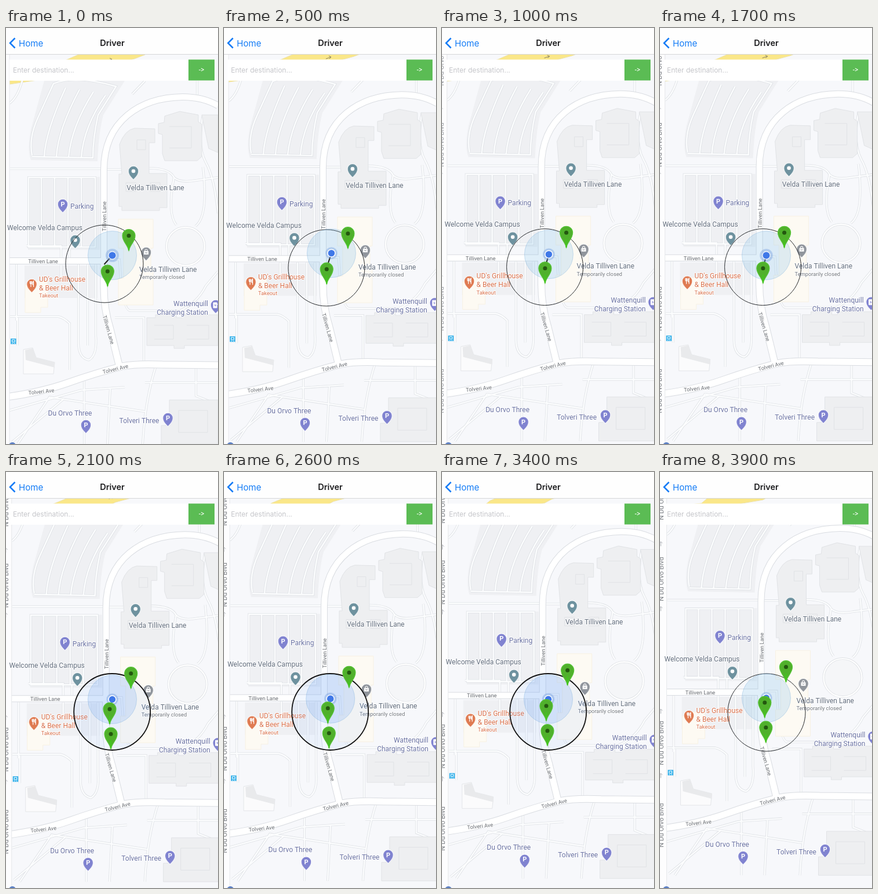
An HTML page with a canvas for the animation above (4000 ms loop, 366x718 px).

```html
<!DOCTYPE html>
<html lang="en">
<head>
<meta charset="utf-8">
<title>Driver</title>
<style>
html, body { margin: 0; width: 366px; height: 718px; overflow: hidden; background: #fff; }
canvas { display: block; width: 366px; height: 718px; }
</style>
</head>
<body>
<canvas id="stage"></canvas>
<script>
const W = 366, H = 718, LOOP = 4000, STEP = 100;
const canvas = document.getElementById('stage');
const ctx = canvas.getContext('2d');
const ratio = window.devicePixelRatio || 1;
canvas.width = W * ratio;
canvas.height = H * ratio;

const SLATE = '#626d7d', TEAL = '#6e929f', PURPLE = '#8083d0', INDIGO = '#6b73a3', ORANGE = '#df7b52';

// The map recentres in short moves; the dot rides along, then slides back to the middle.
const MAP_KEYS = [[0, 0, 0], [300, 0, 0], [600, 2.6, -5.2], [1700, 2.6, -5.2], [2000, 3.7, -10.8],
  [2500, 3.7, -10.8], [2800, 4.7, -16.3], [3600, 4.7, -16.3], [3900, 5.5, -21.9]];
const DOT_KEYS = [[0, 183.5, 392.5], [300, 183.5, 392.5], [600, 186.1, 387.3], [700, 186.1, 387.3], [1200, 183.5, 392.5],
  [2500, 183.5, 392.5], [2800, 184.2, 388.3], [3200, 183.5, 392.3], [3600, 183.5, 392.3], [3900, 183.5, 390]];

function ease(keys, t) {
  const next = keys.findIndex(k => k[0] > t);
  if (next < 0) return keys[keys.length - 1].slice(1);
  const a = keys[next - 1], b = keys[next];
  const p = (t - a[0]) / (b[0] - a[0]), s = p * p * (3 - 2 * p);
  return [1, 2].map(i => a[i] + (b[i] - a[i]) * s);
}

function shape(d, fill, line, width = 1) {
  const path = new Path2D(d);
  if (fill) { ctx.fillStyle = fill; ctx.fill(path); }
  if (line) { ctx.strokeStyle = line; ctx.lineWidth = width; ctx.stroke(path); }
}

function disc(x, y, r, fill, line, width = 1) {
  ctx.beginPath();
  ctx.arc(x, y, r, 0, Math.PI * 2);
  if (fill) { ctx.fillStyle = fill; ctx.fill(); }
  if (line) { ctx.strokeStyle = line; ctx.lineWidth = width; ctx.stroke(); }
}

function text(str, x, y, { size = 12, color = SLATE, align = 'left', angle = 0, weight = 400, font = 'Roboto', halo = 2 } = {}) {
  ctx.save();
  ctx.translate(x, y);
  ctx.rotate(angle * Math.PI / 180);
  ctx.font = `${weight} ${size}px ${font}, sans-serif`;
  ctx.textAlign = align;
  ctx.textBaseline = 'middle';
  if (halo) {
    ctx.lineJoin = 'round';
    ctx.lineWidth = halo;
    ctx.strokeStyle = 'rgba(255,255,255,.85)';
    ctx.strokeText(str, 0, 0);
  }
  ctx.fillStyle = color;
  ctx.fillText(str, 0, 0);
  ctx.restore();
}

function pin(x, y, r, length, fill, line) {
  ctx.save();
  ctx.translate(x, y);
  shape(`M0 ${length}C${-r * .25} ${r * 1.35} ${-r} ${r * .9} ${-r} 0A${r} ${r} 0 1 1 ${r} 0C${r} ${r * .9} ${r * .25} ${r * 1.35} 0 ${length}Z`, fill, line, 1.2);
  ctx.restore();
}

function poi(x, y, color, icon) {
  pin(x, y, 8.8, 15, color, 'rgba(255,255,255,.8)');
  ctx.save();
  ctx.translate(x, y);
  if (icon === 'P') text('P', 0, .5, { size: 11, color: '#fff', align: 'center', weight: 700, halo: 0 });
  else if (icon === 'food') shape('M-3 -5v3q0 2 1.5 2t1.5 -2v-3M-1.5 -5V5M3 5V-5Q1 -3 1.5 1H3', null, '#fff', 1.2);
  else if (icon === 'bag') {
    shape('M-4 -2H4V4H-4Z', '#fff');
    shape('M-2 -2v-1a2 2 0 0 1 4 0v1', null, '#fff', 1.2);
    shape('M-1.5 0a1.5 1.5 0 0 0 3 0', null, color, 1);
  } else if (icon === 'plug') {
    shape('M-4 -4H2V5H-4ZM3 -2L5 0V3', '#fff', '#fff');
    shape('M0 -3L-2.5 1H-.5L-1.5 4L1 0H-1Z', color);
  } else disc(0, 0, 3.3, '#fff');
  ctx.restore();
}

function greenPin(x, y) {
  pin(x, y, 11, 25.5, '#50b02c', '#55c436');
  shape(`M${x} ${y + 11}V${y + 25.5}`, null, '#43c51f', 2.4);
  disc(x, y, 3.5, '#23570f');
}

const LOTS = [
  'M66 91H205L168 150Q160 180 158 230L43 228Q36 210 43 175Z',
  'M38 257H162V383H38Z', 'M32 410H158V466H32Z'
];

const AISLES = [
  'M45 220Q39 190 55 155L82 96Q120 80 190 101L159 150Q150 190 150 224L45 222',
  'M66 222Q68 180 103 103', 'M87 222Q90 175 127 106', 'M108 223Q113 170 151 110', 'M130 223Q134 170 172 116',
  'M39 258H154V378H39Z', 'M61 258V378', 'M84 258V378', 'M107 258V378', 'M130 258V378',
  'M7 243H168', 'M18 408V505', 'M7 498H90Q100 500 110 510V590', 'M20 548V500',
  'M125 408V545Q126 570 143 573Q158 565 155 530V408M141 408V548', 'M95 408V434H125', 'M35 376L95 376V400M110 378V400',
  'M172 244H215Q280 236 290 258Q300 268 328 263L366 258', 'M340 150Q330 205 345 232T366 320',
  'M180 400H196Q200 488 215 488H300Q330 475 345 445L366 420', 'M294 340Q278 320 290 258M327 342Q350 325 340 240',
  'M188 500H238V575', 'M260 580Q240 640 236 718M328 582V635L366 650',
  'M6 660L130 625L205 620M20 718L75 637L240 662M135 608V718M175 718L180 623',
  'M10 715L100 640M240 612L366 612', 'M218 114L240 91M330 116V91M6 130Q20 120 28 91'
];

const ROADS = [
  ['M169 450V245C169 160 232 120 305 119Q340 119 366 134', 10],
  ['M6 402H169', 10],
  ['M169 400V448Q169 485 180 520L195 581', 11],
  ['M0 637Q60 629 108 612T200 584Q225 579 270 581L366 582', 11]
];

const BUILDINGS = [
  'M196 201Q205 176 222 173L257 174V198H247V251H278V310H265V315H200V308H195V252H200Z',
  'M274 152L300 144L332 150V162L338 166V222L330 229H274L270 217V184L263 182V165L273 163Z',
  'M338 150H366V215L350 208Z',
  'M243 500H258V495H294V500H304V495H366V548H308V553H290V548H243Z',
  'M282 642H366V718H268V686H282Z'
];

const SAND = ['M194 330H254V380H250V420H254V478H194V432H203V380H194Z', 'M33 443H48V436H72V482H60V491H33Z'];

function drawGround() {
  ctx.fillStyle = '#f7f8fb';
  ctx.fillRect(-20, 0, 400, 780);
  LOTS.forEach(d => shape(d, '#eff0f3'));
  shape('M6 82L66 76L78 66L95 59L125 46H240L222 53L185 63L172 70L47 91L6 97Z', '#fae789', '#eee2a6');
  shape('M174 57l9 -3m-4 -2l4 2l-3 3', null, '#8b835e', 1);
  AISLES.forEach(d => shape(d, null, '#dee1e5', 4));
  AISLES.forEach(d => shape(d, null, '#fcfdfe', 2.4));
  disc(310, 377, 33, '#f5f6f8', '#dee1e5', 4);
  disc(310, 377, 33, null, '#fff', 2.4);
  BUILDINGS.forEach(d => shape(d, '#eeeff1', '#e1e3e6'));
  shape('M226 193H241V210H226ZM207 267H224V282H207ZM249 267H266V282H249ZM282 170H320V207H282M256 513H289V537H256M312 513H350V537H312M298 660H348V698H298Z', null, '#e0e2e5');
  shape('M30 555L46 552L52 569L84 577L82 597H30Z', '#fbfbfc', '#e4e6e9');
  shape('M33 556L46 553L52 569L84 577V586L34 573Z', '#e9eaec');
  SAND.forEach(d => shape(d, '#fdfaf3', '#f7f1e3'));
  ROADS.forEach(([d, w]) => shape(d, null, '#d9dce1', w + 2));
  ROADS.forEach(([d, w]) => shape(d, null, '#fff', w));
  ctx.fillStyle = '#fdfdfe';
  ctx.fillRect(-20, 0, 26, 780);
  shape('M6 0V780', null, '#e6e8eb');
}

function drawLabels(t) {
  const street = { size: 9.3, color: '#686c72', align: 'center' };
  text('Tilliven Lane', 64, 403, street);
  text('Tilliven Lane', 170.5, 325, { ...street, angle: -90 });
  text('Tilliven Lane', 176.5, 521, { ...street, angle: 74 });
  text('Tolveri Ave', 189, 589, { ...street, angle: -14 });
  text('Tolveri Ave', 61, 628, { ...street, angle: -6 });

  ctx.globalAlpha = Math.max(0, Math.min(1, (t - 700) / 400));
  [105, 245, 528, 670].forEach(y => text('N Du Orvo Blvd', -2.8, y, { size: 11.5, color: '#777b81', angle: -90 }));
  [146, 258, 435, 546].forEach(y => shape(`M-4 ${y + 4}V${y - 4}M-7 ${y - 1}L-4 ${y - 4}L-1 ${y - 1}`, null, '#b5b8bd'));
  ctx.globalAlpha = 1;

  poi(220, 247, TEAL);
  text('Velda Tilliven Lane', 258, 276, { align: 'center' });
  poi(98, 304, PURPLE, 'P');
  text('Parking', 111, 308, { color: INDIGO });
  poi(119.5, 366, TEAL);
  text('Welcome Velda Campus', 132, 345, { align: 'right' });
  poi(242, 387, '#90959c', 'bag');
  text('Velda Tilliven Lane', 230, 417);
  text('Temporarily closed', 230, 430, { size: 9.3, color: '#71767d' });
  poi(44.5, 442, ORANGE, 'food');
  text("UD's Grillhouse", 57, 434, { color: '#d9714c' });
  text('& Beer Hall', 57, 449, { color: '#d9714c' });
  text('Takeout', 57, 462, { size: 9.3, color: '#d9714c' });
  poi(362, 478, PURPLE, 'plug');
  text('Wattenquill', 349, 476, { color: INDIGO, align: 'right' });
  text('Charging Station', 349, 491, { color: INDIGO, align: 'right' });
  poi(138, 685, PURPLE, 'P');
  text('Du Orvo Three', 110.5, 665, { color: INDIGO, align: 'center' });
  poi(279.5, 673, PURPLE, 'P');
  text('Tolveri Three', 230, 678, { color: INDIGO, align: 'center' });

  ctx.fillStyle = '#35b1ea';
  ctx.fillRect(8, 536, 9.5, 9.5);
  shape('M10.5 538H15V542H10.5ZM11 543.5V545M14.5 543.5V545', null, '#fff', 1);
}

function drawTracking(t, mx, my) {
  const [x, y] = ease(DOT_KEYS, t);
  const early = t < 400, paired = t >= 1900, bold = paired && t < 3700;
  const pulse = .5 + .5 * Math.cos(t / 1500 * Math.PI * 2);

  if (!paired) disc(mx + (early ? 170 : 175), my + (early ? 407 : 417.8), early ? 67 : 66, null, '#25282b', 1);
  else if (bold) disc(183.2, 414, 66, 'rgba(80,135,255,.07)', '#111', 1.8);
  else disc(184, 415, 67, null, '#25282b', 1);

  disc(x, y, 42, bold ? 'rgba(110,165,240,.22)' : 'rgba(120,185,230,.23)', 'rgba(110,165,215,.35)', 1);
  if (!paired) {
    ctx.beginPath();
    ctx.moveTo(x, y);
    ctx.lineTo(mx + (early ? 169.5 : 177.5), my + (early ? 408 : 411));
    ctx.strokeStyle = '#222';
    ctx.lineWidth = 2;
    ctx.stroke();
  }
  disc(x, y, 10 + pulse * 1.5, 'rgba(120,160,225,.42)');
  disc(x, y, 7.2, '#fff');
  disc(x, y, 5.6 + pulse * .5, '#3f78e8');

  greenPin(mx + 212, my + 358.5);
  greenPin(mx + 175.3, my + 420);
  if (paired) greenPin(mx + 177.3, my + 463);
}

function drawChrome() {
  const ui = { font: 'Inter', halo: 0 };
  ctx.fillStyle = '#fff';
  ctx.fillRect(6, 54.5, 309, 36.5);
  ctx.fillStyle = '#5bbc54';
  ctx.fillRect(315, 54.5, 45, 36);
  text('Enter destination...', 12, 73, { ...ui, size: 12, color: '#c5c6ca' });
  text('->', 337.5, 72.5, { font: 'Roboto', halo: 0, size: 12, color: '#fff', align: 'center' });

  ctx.fillStyle = '#fefefe';
  ctx.fillRect(0, 0, W, 46);
  ctx.fillStyle = '#d5d6d8';
  ctx.fillRect(0, 45, W, 1);
  shape('M15.5 17.5L7 26L15.5 34.5', null, '#147cf6', 2.6);
  text('Home', 22, 27, { ...ui, size: 15.1, color: '#147cf6' });
  text('Driver', 183.5, 26.8, { ...ui, size: 14.5, color: '#1b1b1d', align: 'center', weight: 600 });
  disc(11, 721, 6, '#5b7fc4');
}

function render(now) {
  const t = Math.floor((now % LOOP) / STEP) * STEP;
  const [mx, my] = ease(MAP_KEYS, t);
  ctx.setTransform(ratio, 0, 0, ratio, 0, 0);
  ctx.clearRect(0, 0, W, H);
  ctx.save();
  ctx.translate(mx, my);
  drawGround();
  drawLabels(t);
  ctx.restore();
  drawTracking(t, mx, my);
  drawChrome();
}

const start = performance.now();
function tick() {
  render(performance.now() - start);
  requestAnimationFrame(tick);
}
tick();
</script>
</body>
</html>
```
